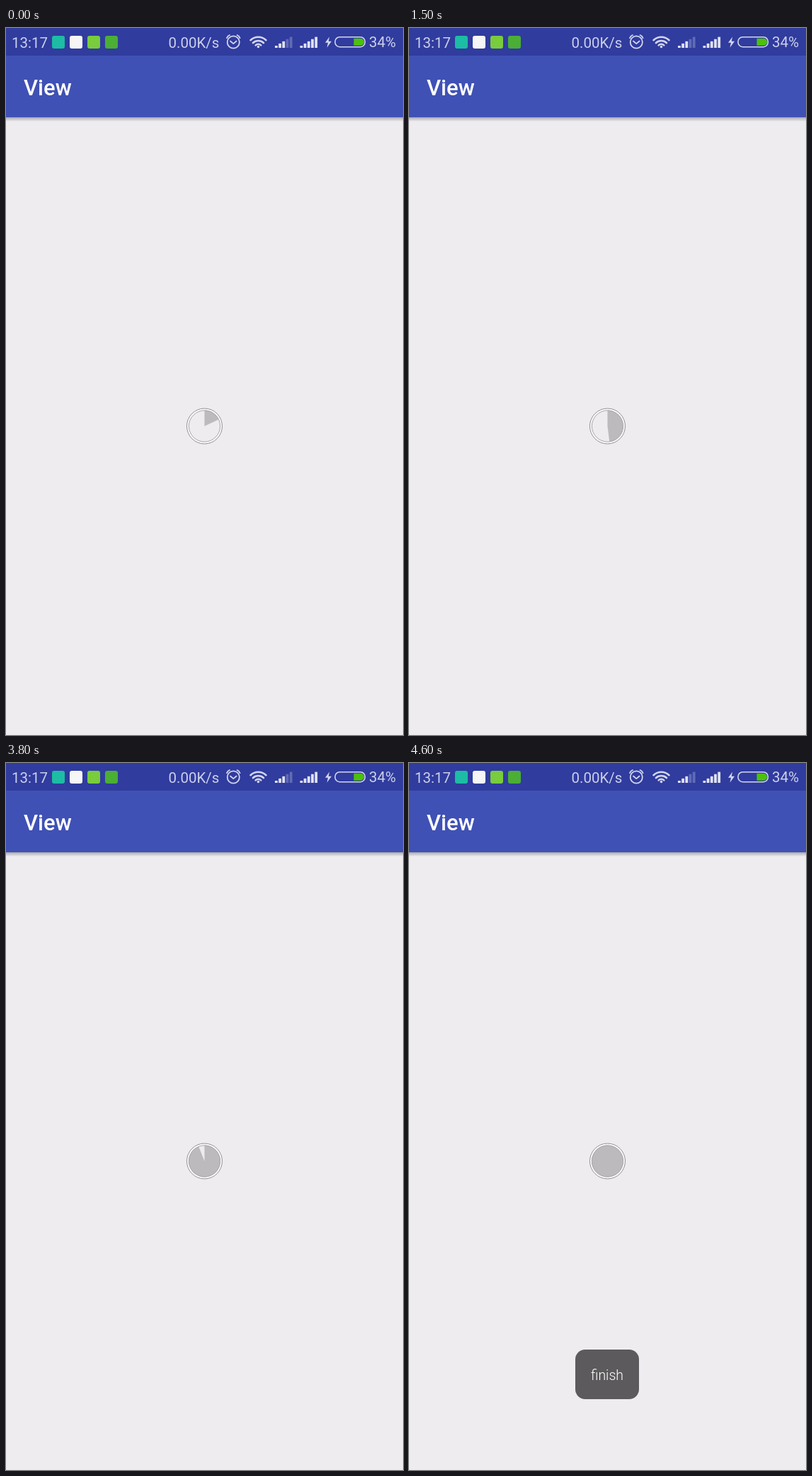
Write an HTML page that moves like this. It is 561x998 px and loops after 5000 ms.

```html
<!DOCTYPE html>
<html lang="en">
<head>
<meta charset="utf-8">
<title>View</title>
<style>
  html, body { margin: 0; width: 100%; height: 100%; overflow: hidden; background: #eeecef; }
  svg { display: block; width: 561px; height: 998px; font-family: Roboto, sans-serif; }
  .line { fill: none; stroke: #d3d6ee; stroke-width: 1.8; stroke-linecap: round; stroke-linejoin: round; }
  .status { fill: #cdd0ea; font-size: 20.5px; }
</style>
</head>
<body>
<svg viewBox="0 0 561 998">
  <defs>
    <linearGradient id="shade" x2="0" y2="1">
      <stop stop-color="#a9a8b0"/>
      <stop offset="1" stop-color="#eeecef"/>
    </linearGradient>
  </defs>
  <rect width="561" height="998" fill="#eeecef"/>
  <rect y="126" width="561" height="6" fill="url(#shade)"/>
  <rect width="561" height="126" fill="#3f51b5"/>
  <rect width="561" height="39" fill="#303c9e"/>
  <text x="25" y="95" font-size="31" font-weight="500" fill="#fff">View</text>

  <g class="status">
    <text x="8" y="28">13:17</text>
    <text x="229.5" y="28">0.00K/s</text>
    <text x="513" y="27">34%</text>
  </g>
  <rect x="65" y="11" width="18" height="18" rx="3" fill="#1dbca4"/>
  <rect x="90" y="11" width="18" height="18" rx="3" fill="#f6f6f6"/>
  <rect x="115" y="11" width="18" height="18" rx="3" fill="#79cc3c"/>
  <rect x="140" y="11" width="18" height="18" rx="3" fill="#4bae35"/>

  <g class="line">
    <circle cx="321.3" cy="20" r="8.6"/>
    <path d="M317 18.5l4.3 3.6 4.3-3.6M312 14.2q1-3 4-4.2M330.6 14.2q-1-3-4-4.2"/>
    <path d="M345.5 17.2a16 16 0 0 1 22 0M349 21a11 11 0 0 1 15 0M352.7 24.4a5.6 5.6 0 0 1 7.6 0" stroke-width="2.6"/>
    <rect x="465" y="12.7" width="42.3" height="14" rx="6.5" stroke-width="1.6"/>
  </g>
  <circle cx="356.5" cy="26.5" r="1.8" fill="#d3d6ee"/>
  <g id="bars"></g>
  <path d="M457 12.5l-6 8.2h4l-1.5 7 6.5-9h-4.2z" fill="#d3d6ee"/>
  <path d="M491.5 14.7h9.5a5 5 0 0 1 0 10h-9.5z" fill="#4cc10c"/>

  <g fill="none">
    <circle cx="280.5" cy="562" r="23.6" stroke="#fbfafb" stroke-width="2.4"/>
    <circle cx="280.5" cy="562" r="25" stroke="#939194"/>
    <path id="pie" fill="#bcbabd"/>
    <circle cx="280.5" cy="562" r="22.1" stroke="#a9a7aa"/>
  </g>

  <g id="toast">
    <rect x="235" width="90" height="70" rx="14" fill="#5c5a5c"/>
    <text x="280" y="42.5" font-size="19.5" font-weight="300" fill="#fff" text-anchor="middle">finish</text>
  </g>
</svg>
<script>
  const find = id => document.getElementById(id);
  const pie = find('pie'), toast = find('toast');

  function addBars(x, lit) {
    for (let i = 0; i < 5; i++) {
      const h = 3 + i * 3.1;
      find('bars').innerHTML +=
        `<rect x="${x + i * 5.2}" y="${28 - h}" width="3.8" height="${h}" fill="${i < lit ? '#dfe1f3' : '#606bb5'}"/>`;
    }
  }

  function wedge(degrees) {
    const x = 280.5, y = 562, r = 22.4;
    if (degrees >= 360) return `M${x} ${y - r}a${r} ${r} 0 1 1 -.01 0z`;
    const a = degrees * Math.PI / 180;
    return `M${x} ${y}V${y - r}A${r} ${r} 0 ${+(degrees > 180)} 1 ${x + r * Math.sin(a)} ${y - r * Math.cos(a)}z`;
  }

  function overshoot(t) {
    const u = t - 1;
    return u * u * (3 * u + 2) + 1;
  }

  function draw() {
    const step = Math.floor(performance.now() % 5000 / 100);
    pie.setAttribute('d', wedge(64.8 + 7.2 * step));

    // The toast springs up from below, then rests
    const t = Math.min(1, 0.195 + (step - 43) * 0.2684);
    toast.setAttribute('opacity', step < 43 ? 0 : Math.min(1, 2.1 * t));
    toast.setAttribute('transform', `translate(0 ${973 - 145 * overshoot(t)})`);
    requestAnimationFrame(draw);
  }

  addBars(380, 3);
  addBars(415.5, 5);
  draw();
</script>
</body>
</html>
```
